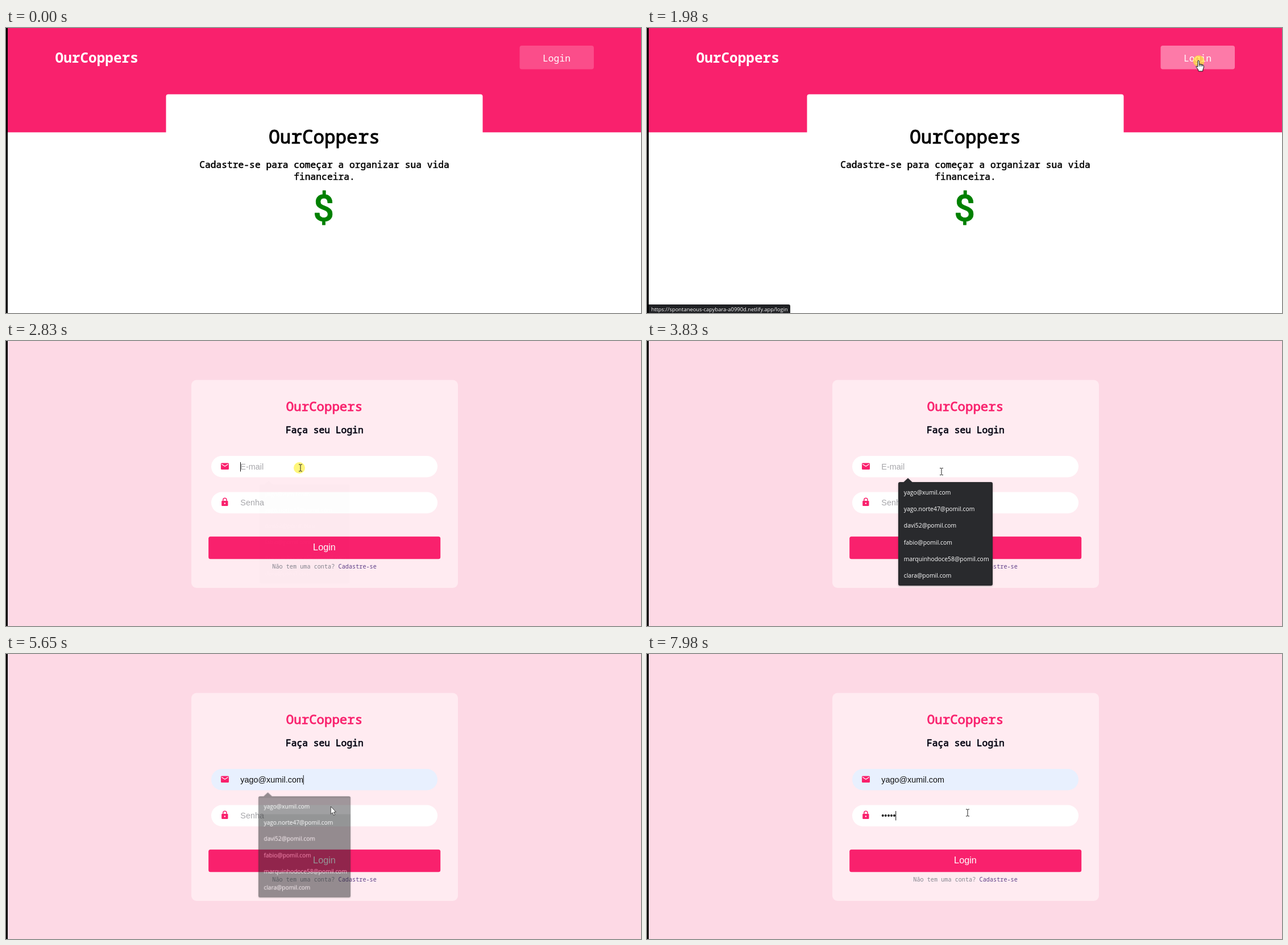
An HTML page with a canvas for the animation above (8000 ms loop, 1117 by 501 pixels).

```html
<!DOCTYPE html>
<html lang="pt">
<head>
<meta charset="utf-8">
<title>OurCoppers</title>
<style>
html, body { margin: 0; width: 100%; height: 100%; overflow: hidden; background: #fff; }
canvas { display: block; }
</style>
</head>
<body>
<canvas id="stage" width="1117" height="501"></canvas>
<script>
const stage = document.getElementById('stage').getContext('2d');
const layer = document.createElement('canvas').getContext('2d');
let ctx = stage;
const LOOP = 8000, W = 1117, H = 501;
layer.canvas.width = W;
layer.canvas.height = H;

const PINK = '#f9216d', DARK = '#292a2d';
const MONO = '"Noto Sans Mono", monospace';
const ARIAL = '"Liberation Sans", Arial, sans-serif';
const UI = '"Open Sans", sans-serif';
const BRAND = 'OurCoppers';
const EMAIL = 'yago@xumil.com';
const SUGGESTIONS = [EMAIL, 'yago.norte47@pomil.com', 'davi52@pomil.com',
  'fabio@pomil.com', 'marquinhodoce58@pomil.com', 'clara@pomil.com'];
const KEY_TIMES = [6960, 7170, 7430, 7700, 7980];

// start, end, steps, x, y reached
const MOVES = [
  [120, 520, 6, 988, 134], [670, 890, 4, 989, 78], [1060, 1520, 7, 970, 57],
  [2210, 2620, 7, 518, 223], [3830, 3900, 2, 518, 236], [4100, 4240, 3, 526, 257],
  [4850, 5250, 6, 544, 263], [5510, 5650, 3, 571, 268], [5720, 5930, 4, 564, 279]
];

const within = (t, a, b) => t >= a && t < b;
const ramp = (t, a, b) => Math.min(1, Math.max(0, (t - a) / (b - a)));

function pointer(t) {
  let x = 1110, y = 560;
  for (const [a, b, n, tx, ty] of MOVES) {
    if (t < a) break;
    const k = Math.min(n, Math.floor((t - a) / (b - a) * (n - 1) + 1e-6) + 1) / n;
    x += (tx - x) * k;
    y += (ty - y) * k;
  }
  return { x, y };
}

function box(x, y, w, h, r, color) {
  ctx.fillStyle = color;
  ctx.beginPath();
  ctx.roundRect(x, y, w, h, r);
  ctx.fill();
}

// extra: outline width that thickens the strokes to a medium weight
function text(str, x, y, font, color, align = 'left', extra = 0) {
  ctx.font = font;
  ctx.fillStyle = color;
  ctx.textAlign = align;
  ctx.fillText(str, x, y);
  if (!extra) return;
  ctx.strokeStyle = color;
  ctx.lineWidth = extra;
  ctx.lineJoin = 'round';
  ctx.strokeText(str, x, y);
}

function poly(points, fill, stroke, width = 1) {
  ctx.beginPath();
  points.forEach(([x, y]) => ctx.lineTo(x, y));
  ctx.closePath();
  ctx.fillStyle = fill;
  ctx.fill();
  ctx.strokeStyle = stroke;
  ctx.lineWidth = width;
  ctx.stroke();
}

function disc(x, y, r, color) {
  ctx.fillStyle = color;
  ctx.beginPath();
  ctx.arc(x, y, r, 0, 7);
  ctx.fill();
}

function home(hover) {
  ctx.fillStyle = '#fff';
  ctx.fillRect(0, 0, W, H);
  ctx.fillStyle = PINK;
  ctx.fillRect(0, 0, W, 183.4);
  text(BRAND, 86.5, 61, `700 24.4px ${MONO}`, '#fff');
  box(903.5, 31, 130.5, 41.5, 4, hover ? '#fd7aa8' : '#fb4d8a');
  text('Login', 968.5, 59, `16.3px ${MONO}`, '#fff', 'center');
  box(281.5, 116.5, 557, 120, 4, '#fff');
  text(BRAND, 560, 203, `32.6px ${MONO}`, '#000', 'center', 1.1);
  const small = `16.3px ${MONO}`;
  text('Cadastre-se para começar a organizar sua vida', 560, 245.5, small, '#000', 'center', 0.55);
  text('financeira.', 560, 266.5, small, '#000', 'center', 0.55);
  text('$', 558.8, 338.5, '500 65px Roboto, sans-serif', '#008000', 'center', 0.8);
}

function mailIcon() {
  box(378, 214.5, 14, 11.5, 1.5, PINK);
  ctx.strokeStyle = '#fff';
  ctx.lineWidth = 1.2;
  ctx.beginPath();
  ctx.moveTo(379.2, 216.4);
  ctx.lineTo(385, 220.2);
  ctx.lineTo(390.8, 216.4);
  ctx.stroke();
}

function lockIcon() {
  box(379.2, 281, 11.3, 9, 1.3, PINK);
  ctx.strokeStyle = PINK;
  ctx.lineWidth = 1.5;
  ctx.beginPath();
  ctx.moveTo(381.8, 282);
  ctx.lineTo(381.8, 279.3);
  ctx.arc(384.9, 279.3, 3.1, Math.PI, 0);
  ctx.lineTo(388, 282);
  ctx.stroke();
  disc(384.9, 285.4, 1.2, '#fff');
}

function caret(x, y) {
  ctx.fillStyle = '#111';
  ctx.fillRect(x, y, 1, 16.5);
}

function login(t) {
  ctx.fillStyle = '#fdd9e5';
  ctx.fillRect(0, 0, W, H);
  box(326, 68.5, 469, 365.5, 9, '#ffebf1');
  text(BRAND, 560, 122.5, `22.4px ${MONO}`, PINK, 'center', 0.9);
  text('Faça seu Login', 560.3, 161.5, `16.3px ${MONO}`, '#0b0b18', 'center', 0.75);

  const preview = within(t, 4170, 5510), filled = t >= 5510;
  box(361, 202, 398, 37.5, 18.7, preview || filled ? '#e8f0fe' : '#fff');
  box(361, 265.5, 398, 37.5, 18.7, '#fff');
  mailIcon();
  lockIcon();

  const font = `14.4px ${ARIAL}`, hint = '#a6a6aa';
  if (filled) text(EMAIL, 412.3, 225.5, font, '#111');
  else if (preview) text(EMAIL, 412.3, 225.5, `13.65px ${ARIAL}`, '#111');
  else text('E-mail', 412.3, 225.5, font, hint);

  const typed = KEY_TIMES.filter(k => t >= k).length;
  if (typed) text('•'.repeat(typed), 412.3, 288.5, font, '#111');
  else text('Senha', 412.3, 288.5, font, hint);

  if (within(t, 2760, 3370) || within(t, 3900, 4450)) caret(412, 213);
  if (within(t, 5510, 6100)) caret(522.7, 213);
  if (within(t, 6170, 6630) || typed) caret(412 + 5.04 * typed, 276);

  box(356.2, 343.8, 408, 39.4, 3.5, PINK);
  text('Login', 560, 368, `16.3px ${ARIAL}`, '#fff', 'center');
  const foot = `10.2px ${MONO}`;
  text('Não tem uma conta?', 468.3, 400.3, foot, '#85858f');
  text('Cadastre-se', 584.6, 400.3, foot, '#5d3f88');
}

// Bubble with a pointed top; painted opaque on a layer, then faded as a whole
function popup(x, y, w, h, alpha, content) {
  if (alpha <= 0) return;
  ctx = layer;
  ctx.clearRect(0, 0, W, H);
  ctx.shadowColor = 'rgba(0,0,0,.35)';
  ctx.shadowBlur = 3;
  ctx.shadowOffsetY = 1;
  ctx.fillStyle = DARK;
  ctx.beginPath();
  ctx.roundRect(x, y, w, h, 3);
  ctx.moveTo(x + 9.5, y);
  ctx.lineTo(x + 17, y - 7);
  ctx.lineTo(x + 24.5, y);
  ctx.fill();
  ctx.shadowColor = 'transparent';
  content();
  ctx = stage;

  const s = 1 - (1 - alpha) * 0.047, cx = x + w / 2, cy = y + h / 2;
  ctx.save();
  ctx.globalAlpha = alpha;
  ctx.translate(cx, cy);
  ctx.scale(s, s);
  ctx.drawImage(layer.canvas, -cx, -cy);
  ctx.restore();
}

function popups(t) {
  const list = ramp(t, 2830, 2970) - ramp(t, 5510, 5790);
  popup(442, 248, 166, 182, list, () => {
    if (t >= 4170) box(442, 251, 166, 29.3, 0, '#404144');
    SUGGESTIONS.forEach((s, i) =>
      text(s, 451.8, 269.7 + i * 29.3, `10.4px ${UI}`, '#fff'));
  });
  const saved = ramp(t, 6100, 6240) - ramp(t, 6960, 7170);
  popup(442, 310.5, 245, 35.5, saved, () => {
    disc(458, 328.2, 6.5, '#4285f4');
    text('Usar senhas salvas na sua Conta do Norbel', 474.5, 332.2, `10.4px ${UI}`, '#9aa0a6');
  });
}

function arrow() {
  poly([[0.3, 0], [0.3, 13.4], [3.3, 10.8], [5.4, 15.6], [7.6, 14.6], [5.5, 10], [9.4, 9.7]],
    '#fff', '#222', 0.8);
}

function hand() {
  poly([[-1.2, 1], [0, -0.2], [1.2, 1], [1.4, 7], [4, 6.6], [6.4, 7.4], [9, 8.6], [9.4, 12],
    [8, 16], [7.6, 19], [0.2, 19], [-0.6, 16], [-4, 11.5], [-3.6, 10], [-1.2, 11.4]],
    '#fff', '#111');
  ctx.beginPath();
  for (const x of [1.6, 4.2, 6.6]) {
    ctx.moveTo(x, 7);
    ctx.lineTo(x, 10.5);
  }
  ctx.stroke();
}

function beam() {
  ctx.strokeStyle = '#222';
  ctx.lineWidth = 1;
  ctx.beginPath();
  for (const s of [-1, 1]) {
    ctx.moveTo(-3, s * 6);
    ctx.lineTo(-0.8, s * 6);
    ctx.lineTo(0, s * 5.2);
    ctx.lineTo(0.8, s * 6);
    ctx.lineTo(3, s * 6);
  }
  ctx.moveTo(0, -5.2);
  ctx.lineTo(0, 5.2);
  ctx.stroke();
}

function draw(t) {
  const { x, y } = pointer(t);
  const onHome = t < 2070;
  const hover = onHome && y < 72.5 && x > 903;
  if (onHome) home(hover);
  else login(t);

  ctx.fillStyle = '#000';
  ctx.fillRect(0, 0, 3, H);

  if (hover || within(t, 2070, 2350)) {
    box(3, 486, 249, 15, [0, 3, 0, 0], '#202124');
    text('https://spontaneous-capybara-a0990d.netlify.app/login', 7.5, 497.6, `9.4px ${UI}`, '#fff');
  }
  if (!onHome) popups(t);

  const inField = !onHome && x > 361 && x < 759 &&
    (within(y, 202, 239.5) || (t > 5700 && y > 265));
  const clicked = within(t, 1980, 2070) || within(t, 2760, 2970) ||
    within(t, 5510, 5600) || within(t, 6100, 6220);
  if (clicked) disc(inField ? x - 2 : x + 0.5, inField ? y : y + 1, 10, 'rgba(255,240,40,.62)');

  ctx.save();
  ctx.translate(x, y);
  ctx.lineJoin = 'round';
  (hover ? hand : inField ? beam : arrow)();
  ctx.restore();
}

const start = performance.now();
function tick() {
  draw((performance.now() - start) % LOOP);
  requestAnimationFrame(tick);
}
tick();
</script>
</body>
</html>
```
